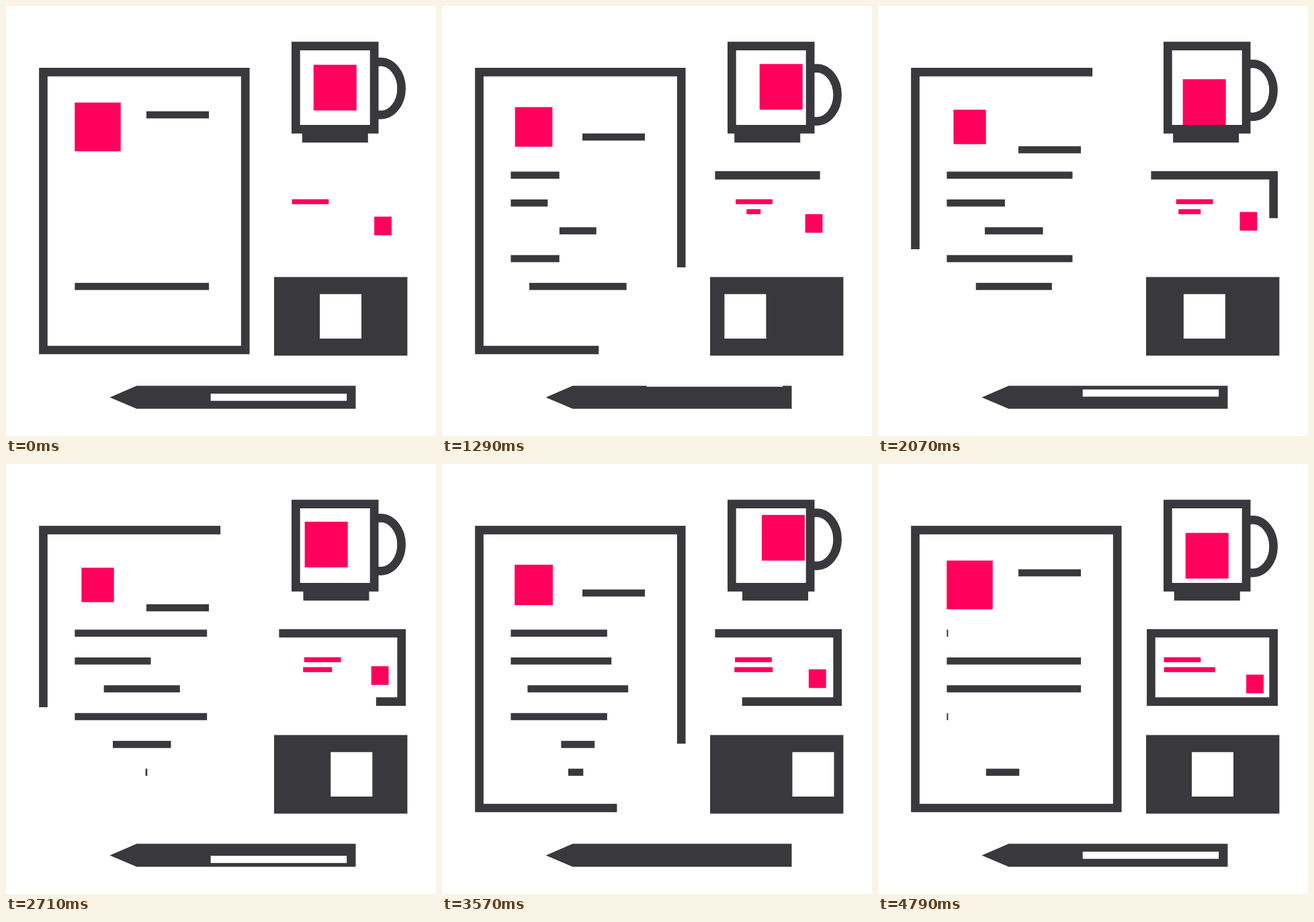
Write an HTML page with a canvas that moves like this. It is 640 by 640 pixels and loops after 4.87 s.

```html
<!DOCTYPE html>
<html lang="en">
<head>
<meta charset="utf-8">
<title>Stationery</title>
<style>
  html, body { margin: 0; width: 100%; height: 100%; overflow: hidden; background: #fff; }
  canvas { display: block; width: 100vw; height: 100vh; }
</style>
</head>
<body>
<canvas id="stage" width="640" height="640"></canvas>
<script>
const ctx = document.getElementById('stage').getContext('2d');
const DARK = '#39383c', PINK = '#ff005c', WHITE = '#fff';
const LOOP = 4870, LAST = 120, HALF = LAST / 2;

// Wall hits as [tick, u, v]; -1 and 1 are the inner walls of the mug
const BOUNCE = [[0, 0, 0], [20, .44, -1], [28, 1, -.33], [52, -.2, 1],
                [64, -1, .05], [87, 1, -.67], [LAST, 0, .7]];
// Three-cornered round trip as [tick, dx, dy]
const TRIP = [[0, 0, 0], [48, -10.9, -5.5], [70, -3.8, -13.2], [LAST, 0, 0]];

const swell = ease(2 / 3, 2 / 3);
const unroll = ease(.82, .74);

// Cubic Bezier easing through (x1, 0) and (x2, 1)
function ease(x1, x2) {
  return x => {
    let lo = 0, hi = 1, s = x;
    for (let i = 0; i < 24; i++) {
      s = (lo + hi) / 2;
      const r = 1 - s;
      if (3 * r * s * (r * x1 + s * x2) + s ** 3 < x) lo = s; else hi = s;
    }
    return s * s * (3 - 2 * s);
  };
}

// Triangle wave: 0, 1, 0, -1, 0 over one loop
const sway = n => Math.asin(Math.sin(2 * Math.PI * n / LAST)) * 2 / Math.PI;

function along(keys, n) {
  const i = Math.max(1, keys.findIndex(k => k[0] >= n));
  const [t0, x0, y0] = keys[i - 1], [t1, x1, y1] = keys[i];
  const f = (n - t0) / (t1 - t0);
  return [x0 + (x1 - x0) * f, y0 + (y1 - y0) * f];
}

function box(color, x, y, w, h) {
  ctx.fillStyle = color;
  ctx.fillRect(x, y, w, h);
}

const centred = (color, x, y, w, h) => box(color, x - w / 2, y - h / 2, w, h);

// Strokes the part of a closed outline from distance a to distance b
function outline(points, a, b, total) {
  if (b <= a) return;
  ctx.strokeStyle = DARK;
  ctx.lineWidth = 12.7;
  ctx.beginPath();
  points.forEach(([x, y]) => ctx.lineTo(x, y));
  ctx.closePath();
  if (b - a < total) ctx.setLineDash([b - a, total]);
  ctx.lineDashOffset = -a;
  ctx.stroke();
  ctx.setLineDash([]);
}

function drawPage(n, p, tri) {
  const l = 55.5, r = 356.2, t = 98.3, b = 512, total = 2 * (r - l + b - t);
  const cut = tri ? 512 * unroll(tri / HALF) : 0;
  outline([[r, b], [r, t], [l, t], [l, b]], cut, total - cut, total);

  const scale = 1 - .34 * tri / HALF;
  centred(PINK, 136.5, 180, 68.4 * scale, 72.6 * scale);
  box(DARK, 209, 156.7 + tri, 93, 10.6);

  const left = 102.4, full = 199.7, mid = left + full / 2;
  const row = (i, x, w) => box(DARK, x, 246.5 + 41.4 * i, w, 10.6);
  const wave = n < HALF ? swell(n / HALF) : 1 - .99 * swell(n / HALF - 1);
  if (n) [0, 3].forEach(i => row(i, left, full * wave));
  row(1, left, full * p);
  row(2, mid - full * p / 2, full * p);
  row(4, mid - full * (1 - p) / 2, full * (1 - p));
  const tail = Math.max(0, n - 65) * .9;
  row(5, 210.3 - tail, tail);
}

function drawMug(n) {
  const s = sway(n), [u, v] = along(BOUNCE, n);
  ctx.strokeStyle = DARK;
  ctx.lineWidth = 12.7;
  ctx.beginPath();
  ctx.ellipse(557.3, 122.7 + 10.5 * s, 31.3, 39.5, 0, 0, 2 * Math.PI);
  ctx.stroke();
  box(DARK, 440.8 - 6.2 * s, 189, 98, 14.3);
  box(DARK, 425, 53.2, 129.5, 136.6);
  box(WHITE, 437.7, 66, 104, 111);
  centred(PINK, 489.7 + 20 * u, 121.5 + 21.5 * v, 64, 68);
}

function drawCard(n, p, tri) {
  const l = 406.4, r = 588.7, t = 252, b = 353.7, total = 2 * (r - l + b - t);
  outline([[l, t], [r, t], [r, b], [l, b]], 0, total * p, total);
  box(PINK, 425.6 + .35 * tri, 287.6, 54.7, 7.4);
  centred(PINK, 463.7, 306.1, 76 * p, 7.4);
  const [dx, dy] = along(TRIP, n);
  box(PINK, 548.1 + dx, 313.5 + dy, 25.8, 27.8);
}

function drawBadge(n, tri) {
  box(DARK, 399, 403.4, 198.4, 117);
  box(WHITE, 467 + .04 * tri - 53.25 * sway(n), 428.8, 62, 66.2);
}

function drawPen(p) {
  const y = 582.4, h = 17.2, span = 46.7;
  ctx.fillStyle = DARK;
  ctx.beginPath();
  ctx.moveTo(154.5, y);
  ctx.lineTo(194.5, y - h);
  ctx.lineTo(520.5, y - h);
  ctx.lineTo(520.5, y + h);
  ctx.lineTo(194.5, y + h);
  ctx.fill();
  // The slot leaves below and comes back from above, twice a loop
  const shift = ((2 * p + .5) % 1 - .5) * span;
  centred(WHITE, 405.9, y - .1 + shift, 202.5, 10.7);
}

// Artwork runs at 25 ticks a second, shown 14 times a second
function tickAt(ms) {
  const shown = Math.floor((Math.floor(ms / 10) * 10 + 5) * 14 / 1000);
  return Math.min(LAST, Math.ceil(shown * 25 / 14));
}

function draw(ms) {
  const n = tickAt(ms), p = n / LAST, tri = Math.min(n, LAST - n);
  box(WHITE, 0, 0, 640, 640);
  drawPage(n, p, tri);
  drawMug(n);
  drawCard(n, p, tri);
  drawBadge(n, tri);
  drawPen(p);
}

let start;
function loop(now) {
  start ??= now;
  draw((now - start) % LOOP);
  requestAnimationFrame(loop);
}
draw(0);
requestAnimationFrame(loop);
</script>
</body>
</html>
```
